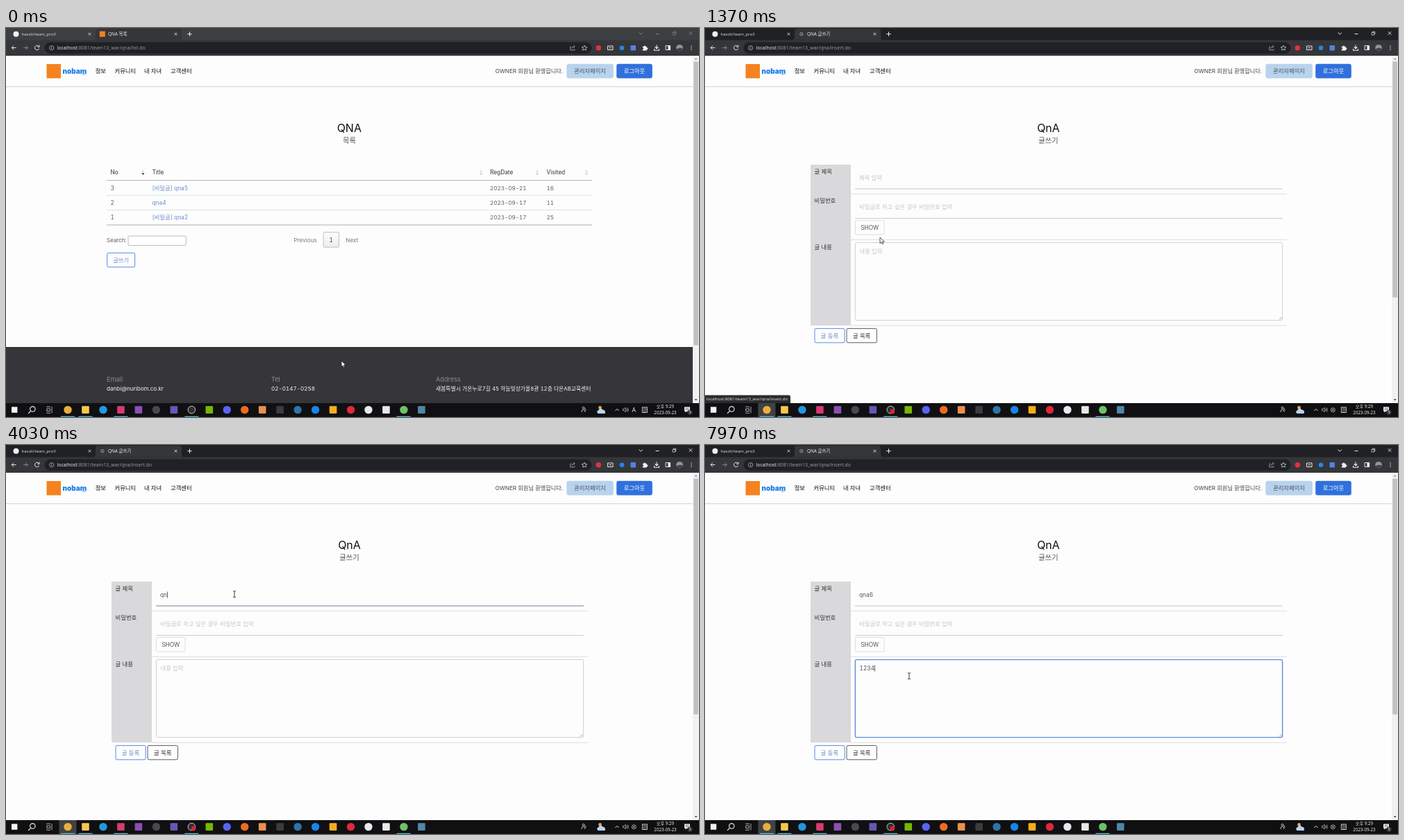
Write an HTML page that moves like this. It is 998 by 561 pixels and loops after 8000 ms.

```html
<!DOCTYPE html>
<html lang="ko">
<head>
<meta charset="utf-8">
<title>QNA</title>
<style>
html, body { margin: 0; width: 100%; height: 100%; overflow: hidden; background: #fdfdfd; }
svg { display: block; width: 100vw; height: 100vh; }
text { font-family: Inter, "Noto Sans CJK KR", "Noto Sans CJK", sans-serif; font-variant-numeric: tabular-nums; white-space: pre; }
.ui { font-family: "Open Sans", "Noto Sans CJK KR", "Noto Sans CJK", sans-serif; }
</style>
</head>
<body>
<svg id="stage" viewBox="0 0 998 561" xmlns="http://www.w3.org/2000/svg"></svg>
<script>
const LOOP = 8000, ACTIVATE = 900, OPEN = 1080, FOCUS_TITLE = 1850, FOCUS_BODY = 6750;
const BLUE = '#3070dc', LINK = '#6c8dcc', GREY = '#606064', PALE = '#c6c6ca';

// Markup helpers
const text = (x, y, s, size = 8.3, fill = '#333', attrs = '') =>
  `<text x="${x}" y="${y}" font-size="${size}" fill="${fill}" ${attrs}>${s}</text>`;
const ui = (x, y, s, size, fill, attrs = '') => text(x, y, s, size, fill, 'class="ui" ' + attrs);
const mid = 'text-anchor="middle"';
const rect = (x, y, w, h, fill, r = 0, attrs = '') =>
  `<rect x="${x}" y="${y}" width="${w}" height="${h}" rx="${r}" fill="${fill}" ${attrs}/>`;
const box = (x, y, w, h, stroke, r = 2, fill = 'none', attrs = '') =>
  rect(x, y, w, h, fill, r, `stroke="${stroke}" stroke-width=".8" ${attrs}`);
const dot = (x, y, r, fill, attrs = '') => `<circle cx="${x}" cy="${y}" r="${r}" fill="${fill}" ${attrs}/>`;
const path = (d, stroke = '#e8eaed', w = 1, fill = 'none', attrs = '') =>
  `<path d="${d}" stroke="${stroke}" stroke-width="${w}" fill="${fill}" ${attrs}/>`;
const rule = (x1, x2, y, stroke, w = .8, attrs = '') => path(`M${x1} ${y}H${x2}`, stroke, w, 'none', attrs);
const cross = (x, y, r, c) => path(`M${x - r} ${y - r}l${2 * r} ${2 * r}m0 ${-2 * r}l${-2 * r} ${2 * r}`, c, .9);
const group = (id, body, attrs = '') => `<g id="${id}" ${attrs}>${body}</g>`;

function browser() {
  const controls = path('M911.5 6.5l2.7 2.7 2.7-2.7M935.5 8.5h5') +
    path('M960 6.5h3.6v3.6H960zM961.2 6.5v-1.2h3.6v3.6h-1.2', '#e8eaed', .7) + cross(986, 7.5, 2.3, '#e8eaed');
  const tools =
    path('M14.5 28.5H8.2m3-3l-3 3 3 3') +
    path('M25 28.5h6.3m-3-3l3 3-3 3', '#85878b') +
    path('M47.4 26.7a3.2 3.2 0 1 0 .3 3M48 24.7v2.6h-2.6') +
    path('M814 27h-1.2v4.8h6V30M815 29.5q.3-2.8 4-2.8m-1.6-1.7l1.7 1.7-1.7 1.7', '#c4c7ca', .7) +
    path('M833 25l1.1 2.4 2.7.3-2 1.8.6 2.6-2.4-1.4-2.4 1.4.6-2.6-2-1.8 2.7-.3z', '#d4d6d9', .8) +
    dot(853.3, 28.7, 3.7, '#e5313d') +
    path('M866.5 26h7.5v5.5h-7.5zM868.5 28.7h3.5', '#e8eaed', 1) +
    dot(887, 28.7, 3.3, '#2587e8') + rect(899.5, 25, 7.5, 7.5, '#4d86e0', 1) +
    path('M916.8 26.7h1.8a1.2 1.2 0 1 1 2.4 0h1.8v2a1.1 1.1 0 1 1 0 2v1.7h-6v-2a1 1 0 1 0 0-1.8z', 'none', 0, '#f1f3f4') +
    path('M937 24.6v5m-2.4-2.3l2.4 2.4 2.4-2.4M933.5 30v2.2h7V30', '#f1f3f4', 1.1) +
    path('M950 25.5h6.6v6H950z', '#f1f3f4', .9) + rect(953.4, 25.5, 3.2, 6, '#f1f3f4') +
    dot(970, 28.7, 4.8, '#8f9698') + path('M965.5 30.5q4-3 9-1-1 4-4.5 4t-4.5-3z', 'none', 0, '#3e4446') +
    [26, 28.7, 31.4].map(y => dot(987, y, .7, '#f1f3f4')).join('');
  return rect(0, 0, 998, 18, '#202124', 0, 'id="strip"') + rect(0, 17.5, 998, 22.5, '#35363a') +
    path('M125 17.5q4 0 4-4V5q0-4 4-4h116q4 0 4 4v8.5q0 4 4 4z', 'none', 0, '#35363a') +
    dot(14.5, 8.7, 4, '#f1f3f4') + ui(22.5, 11, 'hasoli/team_pro3', 6.05, '#dfe1e5') +
    cross(120.5, 8.7, 1.8, '#dfe1e5') +
    group('favList', rect(134.8, 4.7, 8, 8, '#f58220')) +
    group('favForm', dot(138.8, 8.7, 2.2, 'none', 'stroke="#a4a7ab" stroke-width=".8"') + path('M137.2 7.2l3.2 3', '#a4a7ab', .7)) +
    ui(147, 11, '', 6.4, '#f1f3f4', 'id="tab"') + cross(244.5, 8.7, 1.8, '#f1f3f4') +
    path('M261.3 8.7h6.4m-3.2-3.2v6.4', '#f1f3f4', 1) + group('controls', controls) +
    rect(55.5, 20.5, 788, 16.6, '#202124', 8.3) +
    dot(65.7, 28.7, 3.1, 'none', 'stroke="#c4c7ca" stroke-width=".7"') + path('M65.7 27.9v2.4M65.7 26.4v.8', '#c4c7ca', .8) +
    `<text class="ui" x="73.5" y="31.2" font-size="7" fill="#9aa0a6"><tspan fill="#f1f3f4">localhost</tspan>:8081/team13_war/qna/<tspan id="page"></tspan></text>` +
    tools;
}

function header() {
  const menu = [[128.7, '정보'], [156.5, '커뮤니티'], [199, '내 자녀'], [237, '고객센터']];
  return rect(0, 40, 998, 501, '#fdfdfd') + rule(0, 989, 84.7, '#cfcfd2', 1) +
    rect(58.5, 52, 20.5, 20.5, '#f58220') +
    text(81.5, 65.5, 'nobam', 10, '#1a7fe8', 'font-weight="900"') + text(110, 68, 'edu', 2.6, '#1a7fe8') +
    menu.map(([x, s]) => text(x, 65, s, 8.3, '#111', 'font-weight="500"')).join('') +
    text(802, 65, 'OWNER 회원님 환영합니다.', 8.2, '#444', 'text-anchor="end"') +
    rect(807.4, 51.8, 67.4, 20.8, '#b8d3ec', 3) + text(841, 65, '관리자페이지', 8.3, '#4a5560', mid) +
    rect(879.2, 51.8, 51.6, 20.8, BLUE, 3) + text(905, 65, '로그아웃', 8.3, '#fff', mid);
}

const arrows = (x, down = '#d0d0d4') =>
  path(`M${x - 2} 207.8l2-3.6 2 3.6z`, 'none', 0, '#dcdce0') + path(`M${x - 2} 209l2 3.6 2-3.6z`, 'none', 0, down);

function list() {
  const cols = [150.5, 210.5, 697, 778.5];
  const rows = [
    ['3', '[비밀글] qna5', '2023-09-21', '16'],
    ['2', 'qna4', '2023-09-17', '11'],
    ['1', '[비밀글] qna2', '2023-09-17', '25']];
  const contact = [
    [145, 'Email', 'danbi@nuribom.co.kr'],
    [382, 'Tel', '02-0147-0258'],
    [619, 'Address', '새봄특별시 가온누로7길 45 하늘빛상가몰8관 12층 다온AB교육센터']];
  return text(494.3, 150, 'QNA', 16, '#111', mid) + text(494.5, 165.8, '목록', 10.3, '#555', mid) +
    ['No', 'Title', 'RegDate', 'Visited'].map((s, i) => text(cols[i], 211.2, s)).join('') +
    arrows(197.3, '#555') + [684, 765, 836].map(x => arrows(x)).join('') +
    rows.map((r, j) => r.map((s, i) =>
      text(cols[i], 233.6 + j * 21.4, s, i > 1 ? 8.1 : 8.3, i === 1 ? LINK : GREY)).join('')).join('') +
    rule(145, 844, 219.8, '#b0b0b4', 1) + rule(145, 844, 241.2, '#d9d9dc') +
    rule(145, 844, 262.5, '#d9d9dc') + rule(145, 844, 284, '#b0b0b4', 1) +
    text(145, 309, 'Search:', 8, GREY) + box(176, 300, 83.3, 13.6, '#a9a9ad', 1.5, '#fff') +
    text(414.5, 308.6, 'Previous', 8.1, '#77777b') + box(457.2, 294.5, 22.3, 21.6, '#b2b2b6', 1, 'url(#shade)') +
    text(468.3, 308.6, '1', 8.3, '#444', mid) + text(489.3, 308.6, 'Next', 8.1, '#77777b') +
    box(145.6, 324.4, 40, 20.4, BLUE, 2, 'none', 'id="write"') + text(165.6, 337.6, '글쓰기', 8.3, LINK, mid + ' id="writeText"') +
    rect(0, 460, 989, 81, '#35353a') +
    contact.map(([x, a, b]) => text(x, 510, a, 9.2, '#8b8b90') + text(x, 523, b, a === 'Address' ? 7.8 : 8.1, '#f4f4f4')).join('');
}

function form() {
  return text(494.5, 150, 'QnA', 16, '#111', mid) + text(494.5, 165.8, '글쓰기', 10.3, '#555', mid) +
    rect(152, 197, 58, 232, '#d9d9db') +
    text(157.5, 210.2, '글 제목', 8.4) + text(157.5, 252.4, '비밀번호', 8.4) + text(157.5, 318.6, '글 내용', 8.4) +
    [239.2, 305.3, 429.2].map(y => rule(210, 838, y, '#d6d6da')).join('') +
    rule(216, 832, 232, PALE, 1, 'id="titleLine"') + rule(216, 832, 274.5, PALE, .9) +
    text(222, 219, '', 8.3, PALE, 'id="title"') +
    text(222, 261.4, '비밀글로 하고 싶은 경우 비밀번호 입력', 8.4, PALE) +
    box(216.4, 277.4, 41.6, 20.6, '#d6d6da') + text(237.2, 290.8, 'SHOW', 8.3, '#55555a', mid) +
    box(216.4, 309.6, 615.2, 112, PALE, 2, 'none', 'id="area"') +
    path('M826.8 420.4l3.8-3.8m-1.8 3.8l1.8-1.8', '#8c8c90', .6) +
    text(222.5, 325, '', 8.3, PALE, 'id="body"') +
    rect(0, 0, .7, 9, '#222', 0, 'id="caret"') +
    box(158, 433.4, 43, 20.4, BLUE) + text(179.5, 446.6, '글 등록', 8.4, LINK, mid) +
    box(204, 433.4, 43.4, 20.4, '#333') + text(225.7, 446.6, '글 목록', 8.4, '#333', mid);
}

function scrollbar() {
  return rect(989, 40, 9, 501, '#f1f1f1') + rect(990.2, 48.5, 6.8, 409, '#c1c1c1', 0, 'id="thumb"') +
    path('M991.6 45.6l2-2.4 2 2.4z', 'none', 0, '#8a8a8a') + path('M991.6 535l2 2.4 2-2.4z', 'none', 0, '#505050');
}

function taskbar() {
  // Plain marks, evenly spaced; capitals are squares
  const marks = 'c#e6b03a S#f5c84c c#2496e0 S#d83a72 S#8b4fb8 c#4a484e S#6a55b5 c#303034 S#76b900 c#5865f2 c#f06a22 S#ee8f4e S#3c3c3e c#2f74a8 c#1b84e8 S#f4ae1c c#e0283c c#e8e8ee S#e8e8e8 c#6fc06a S#4f87a8'.split(' ');
  const icons = marks.map((m, i) => {
    const x = 89 + i * 25.47, c = m.slice(1);
    return m[0] === 'S' ? rect(x - 5.3, 545.3, 10.6, 10.6, c, 1) : dot(x, 550.6, 5.7, c);
  }).join('');
  const tray =
    path('M829 554q0-4 2.5-4t2.5 4M833 548.5q2 .2 2.2 3', '#e8e8e8', .8) + dot(831.5, 547.8, 1.4, 'none', 'stroke="#e8e8e8" stroke-width=".8"') +
    dot(855.5, 547.5, 2.4, '#f4a23a') + path('M852.5 556q-3-3.4 .8-4.8 2.5-5 6-.8 4.8 .4 3.4 5.6z', 'none', 0, '#b5d5f2') +
    path('M877.4 552l2.6-2.6 2.6 2.6', '#f0f0f0', .9) +
    path('M888.5 549.4h1.6l2-2v6.4l-2-2h-1.6z', '#f0f0f0', .6) + path('M893.6 549q1 1.6 0 3.2m1.6-4.6q2 3 0 6', '#f0f0f0', .7) +
    group('imeOn', ui(904.3, 553.8, 'A', 8.6, '#f4f4f4', mid)) +
    group('imeOff', dot(904.3, 550.8, 3, 'none', 'stroke="#e0e0e0" stroke-width=".7"') + cross(904.3, 550.8, 1.3, '#e0e0e0')) +
    box(916.3, 547, 7, 7.4, '#f0f0f0', 0) + ui(919.8, 553, '한', 5.8, '#f4f4f4', mid) +
    ui(949.5, 548.2, '오후 9:29', 6.2, '#f4f4f4', mid) + ui(949.5, 557.3, '2023-09-23', 6.2, '#f4f4f4', mid) +
    path('M977 546.5h8v6.2h-4.5l-2 2v-2H977z', 'none', 0, '#f4f4f4') + path('M978.3 548.4h5.4M978.3 550.4h5.4', '#222', .6) +
    dot(985, 554.3, 3.6, '#34343a') + ui(985, 556.4, '5', 5.6, '#fff', mid);
  return rect(0, 541, 998, 20, '#101012') + rect(76.5, 541, 25, 20, '#414144', 0, 'id="active"') +
    rect(8, 546.4, 8.4, 8.4, '#f4f4f4') +
    dot(38.4, 549.6, 3.7, 'none', 'stroke="#f4f4f4" stroke-width="1.1"') + path('M35.7 552.3l-3.6 3.6', '#f4f4f4', 1.2) +
    path('M58.8 549h4.6v3.6h-4.6zM58.8 547v-.8h4.6v.8M58.8 554.6v.8h4.6v-.8M66 546v9.4', '#d8d8d8', .8) +
    icons + dot(267.3, 550.6, 5.3, 'none', 'stroke="#e8e8e8" stroke-width=".8"') +
    dot(270, 553.2, 3.2, '#e0232e', 'id="rec"') +
    [89, 114.5, 165.4, 267.3, 572.5].map(x => rect(x - 10, 559.8, 20, 1.2, '#57b8d8')).join('') + tray;
}

const status = group('status', path('M0 529.5h120.5q2.5 0 2.5 2.5v9H0z', 'none', 0, '#2b2c2f') +
  ui(2, 537.2, 'localhost:8081/team13_war/qna/insert.do', 6, '#e8eaed'));

const cursors =
  group('arrow', path('M0 0v8.6l2-1.9 1.4 3.1 1.5-.7-1.4-3H6.3z', '#111', .7, '#fff')) +
  group('hand', path('M0 .4q1-.9 1.5.3v3.6l3.6 .8q1 .4 .8 1.6l-.6 3-.5 1.6H.3l-2.6-3.8q.3-1.2 1.5-.4l.8 .8z', '#111', .7, '#fff')) +
  group('beam', path('M-2-4.4q2 0 2 1 0-1 2-1M0-3.4v7M-2 4.6q2 0 2-1 0 1 2 1', '#222', .9));

document.getElementById('stage').innerHTML =
  '<defs><linearGradient id="shade" x2="0" y2="1"><stop stop-color="#fdfdfd"/><stop offset="1" stop-color="#ededed"/></linearGradient></defs>' +
  header() + group('list', list()) + group('form', form()) + scrollbar() + browser() + status + taskbar() + group('cursor', cursors);

const $ = {};
document.querySelectorAll('#stage [id]').forEach(e => $[e.id] = e);
const show = (el, on) => el.setAttribute('display', on ? 'inline' : 'none');
const set = (el, s) => { if (el.textContent !== s) el.textContent = s; };
const clamp = v => Math.min(1, Math.max(0, v));
const ramp = (t, a, b) => clamp((t - a) / (b - a));

// time, x, y
const route = [[0, 483, 480], [180, 483, 480], [780, 157.5, 339.5], [1060, 157.5, 339.5],
  [1370, 252, 302], [1760, 329, 215], [6000, 329, 215], [6600, 294, 333], [LOOP, 294, 333]];

function pointer(t) {
  const i = Math.max(1, route.findIndex(k => k[0] > t));
  const [a, b] = [route[i - 1], route[i]];
  const u = ramp(t, a[0], b[0]), e = u * u * (3 - 2 * u);
  return [a[1] + (b[1] - a[1]) * e, a[2] + (b[2] - a[2]) * e];
}

const titleKeys = [[3600, 'q'], [3950, 'n'], [4230, 'a'], [5750, '6']];
const bodyKeys = [[7300, '1'], [7450, '2'], [7600, '3'], [7750, '4']];
const typed = (keys, t) => keys.filter(k => k[0] <= t).map(k => k[1]).join('');

function field(el, value, hint) {
  set(el, value || hint);
  el.setAttribute('fill', value ? '#55555a' : PALE);
}

function draw(t) {
  const isForm = t >= OPEN, isActive = t >= ACTIVATE, [x, y] = pointer(t);
  const onWrite = !isForm && x < 186 && y > 324 && y < 345;
  const inside = (a, b) => isForm && x > 216 && x < 832 && y > a && y < b;
  const kind = onWrite ? 'hand' : inside(200, 232) || inside(242, 274) || inside(310, 422) ? 'beam' : 'arrow';
  $.cursor.setAttribute('transform', `translate(${x} ${y})`);
  for (const k of ['arrow', 'hand', 'beam']) show($[k], k === kind);

  show($.list, !isForm);
  show($.form, isForm);
  show($.favList, !isForm);
  show($.favForm, isForm);
  set($.tab, isForm ? 'QNA 글쓰기' : 'QNA 목록');
  set($.page, isForm ? 'insert.do' : 'list.do');
  $.thumb.setAttribute('height', isForm ? 340 : 409);
  $.write.setAttribute('fill', onWrite ? BLUE : 'none');
  $.writeText.setAttribute('fill', onWrite ? '#fff' : LINK);

  $.strip.setAttribute('fill', isActive ? '#202124' : '#3c4043');
  $.controls.setAttribute('opacity', isActive ? 1 : .4);
  show($.rec, t >= 400);
  show($.active, t >= 980);
  show($.imeOn, !isForm);
  show($.imeOff, isForm);
  $.status.setAttribute('opacity', ramp(t, 850, 1010) * (1 - ramp(t, 1560, 1720)));

  const inBody = t >= FOCUS_BODY, inTitle = t >= FOCUS_TITLE && !inBody;
  const title = typed(titleKeys, t), body = typed(bodyKeys, t);
  field($.title, title, '제목 입력');
  field($.body, body, '내용 입력');
  $.titleLine.setAttribute('stroke', inTitle ? '#8a7799' : PALE);
  $.area.setAttribute('stroke', inBody ? '#5b8edc' : PALE);
  $.area.setAttribute('stroke-width', inBody ? 1.4 : .8);

  // The caret blinks from the latest key or focus
  const last = [FOCUS_TITLE, FOCUS_BODY, ...titleKeys.map(k => k[0]), ...bodyKeys.map(k => k[0])]
    .filter(k => k <= t).reduce((a, b) => Math.max(a, b), 0);
  show($.caret, (inTitle || inBody) && (t - last) % 1060 < 530);
  const value = inBody ? body : title, el = inBody ? $.body : $.title;
  const width = isForm && value ? el.getComputedTextLength() : 0;
  $.caret.setAttribute('x', (inBody ? 222.5 : 222) + width);
  $.caret.setAttribute('y', inBody ? 317.5 : 211.5);
}

const start = performance.now();
function tick() {
  draw((performance.now() - start) % LOOP);
  requestAnimationFrame(tick);
}
tick();
</script>
</body>
</html>
```
